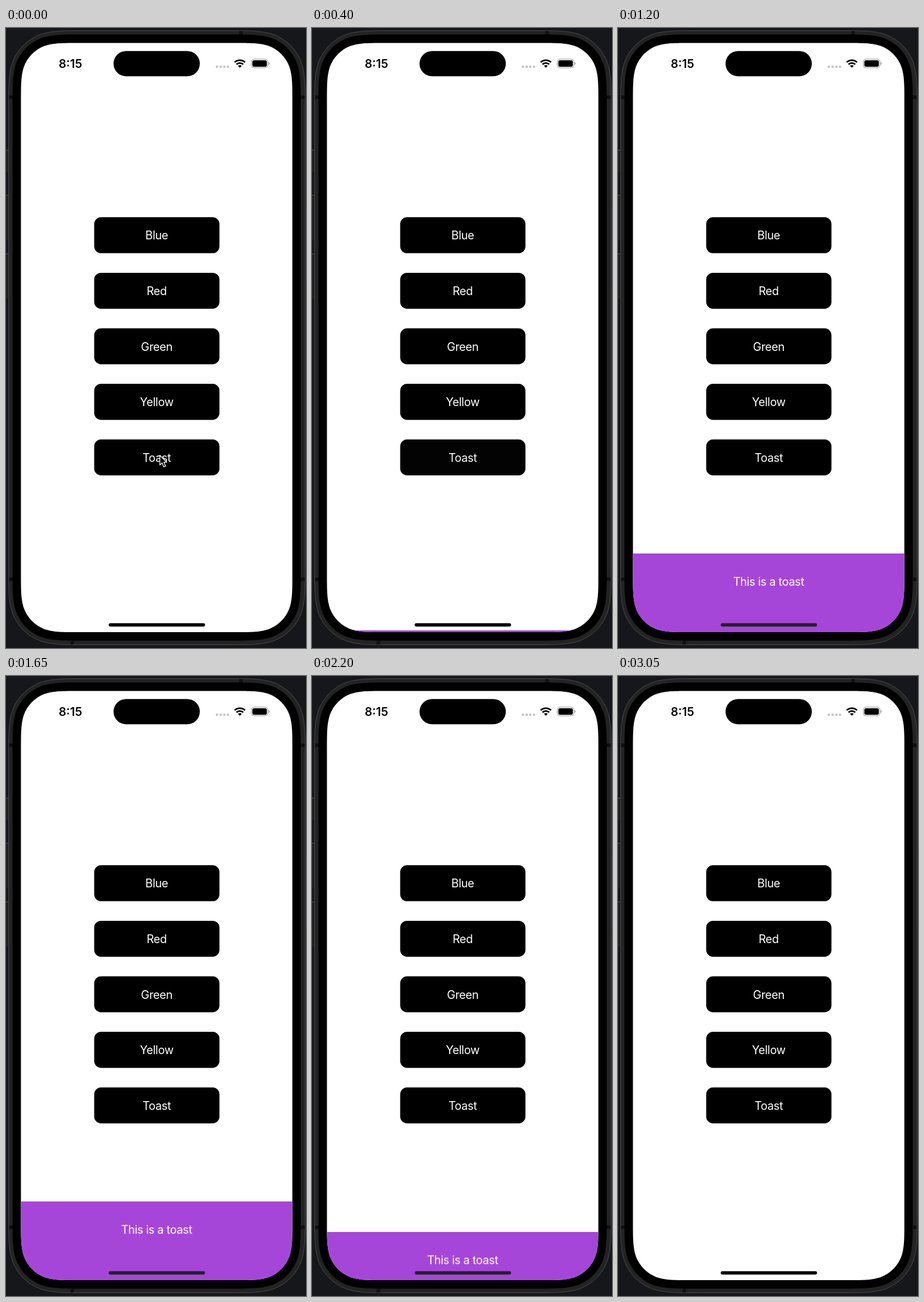
Animation, 512 px wide and 1056 px high, one loop 3100 ms. Source, as an HTML page:

```html
<!DOCTYPE html>
<html lang="en">
<head>
<meta charset="utf-8">
<title>Toast demo</title>
<style>
  html, body { margin: 0; width: 100%; height: 100%; overflow: hidden; background: #15171b; }
  svg { display: block; width: 512px; height: 1056px; }
  text { font: 400 19.5px Inter, Roboto, sans-serif; letter-spacing: -.4px; text-anchor: middle; fill: #fff; }
  .time { font-size: 20px; font-weight: 600; letter-spacing: 0; fill: #000; }
  #toast, #home, #cursor, .press rect, .press text { animation: 3100ms linear infinite; }
  #toast { animation-name: slide; }
  #home { animation-name: tint; }
  #cursor { animation-name: leave; }
  .press rect { animation-name: dim; }
  .press text { animation-name: dim-label; }

  @keyframes slide {
    0%, 11.68% { transform: translateY(136px); animation-timing-function: ease-in-out; }
    21.35%, 66.84% { transform: translateY(0); animation-timing-function: ease-in-out; }
    76.52%, 100% { transform: translateY(136px); }
  }
  @keyframes tint {
    0%, 14% { fill: #000; }
    17%, 72% { fill: #222; }
    75%, 100% { fill: #000; }
  }
  @keyframes leave {
    0%, 1.61% { transform: translate(262px, 727px); animation-timing-function: ease-in; }
    4.84% { transform: translate(273px, 723px); animation-timing-function: ease-in; }
    11.29%, 100% { transform: translate(530px, 690px); }
  }
  @keyframes dim {
    0%, 1.61% { fill: #000; }
    4.84%, 6.45% { fill: #6b6b6b; animation-timing-function: ease-out; }
    14%, 100% { fill: #000; }
  }
  @keyframes dim-label {
    0%, 1.61% { fill: #fff; }
    4.84%, 6.45% { fill: #b2b2b2; animation-timing-function: ease-out; }
    14%, 100% { fill: #fff; }
  }
</style>
</head>
<body>
<svg viewBox="0 0 512 1056">
  <defs><clipPath id="clip"><path class="screen"/></clipPath></defs>
  <rect width="512" height="1056" fill="#15171b"/>

  <g fill="#202022">
    <path d="M0 207.5h5v38h-5zM0 284h5v77h-5zM0 384h5v77h-5zM509 305h3v125h-3z"/>
    <path d="M0 208h4M0 284.5h4M0 384.5h4" stroke="#55565a"/>
  </g>
  <path id="shell" fill="#232324" stroke="#4b4b4d"/>
  <path d="M5 115h6v6h-6zM5 936h6v6h-6zM503 115h7v6h-7zM503 936h7v6h-7zM398 5h6v6h-6zM110 1044h6v6h-6z" fill="#101011"/>
  <path id="bezel"/>
  <path class="screen" fill="#fff"/>

  <text class="time" x="110" y="67.7">8:15</text>
  <rect x="183.5" y="39.2" width="147.3" height="43" rx="21.5"/>
  <g fill="#bdbdbf">
    <circle cx="360" cy="66" r="2"/><circle cx="366.3" cy="66" r="2"/>
    <circle cx="372.6" cy="66" r="2"/><circle cx="378.9" cy="66" r="2"/>
  </g>
  <g fill="none" stroke="#000" stroke-width="2.7">
    <path d="M390.2 58.4a12.8 12.8 0 0 1 17.8 0M393.4 62a8 8 0 0 1 11.4 0"/>
    <path d="M399.1 67.8l-3.2-3.2a4.6 4.6 0 0 1 6.4 0z" fill="#000" stroke="none"/>
  </g>
  <rect x="418.6" y="53.1" width="28.4" height="14.6" rx="4.6" fill="none" stroke="#a2a2a4" stroke-width="1.2"/>
  <rect x="420.4" y="54.9" width="24.8" height="11" rx="3"/>
  <path d="M448.4 58v5q1.7-.8 1.7-2.5t-1.7-2.5z" fill="#a2a2a4"/>

  <g id="buttons"></g>

  <g clip-path="url(#clip)">
    <g id="toast">
      <rect x="20" y="895" width="474" height="136" fill="#a546d9"/>
      <text x="257" y="949.6">This is a toast</text>
    </g>
  </g>
  <rect id="home" x="175.3" y="1013.8" width="164.4" height="5.6" rx="2.8"/>
  <path id="cursor" d="M.6 .8V17.4L4.4 13.8 7.2 20.4 10.2 19.1 7.4 12.7H12.4Z" stroke="#fff" stroke-width="1.3" stroke-linejoin="round"/>
</svg>
<script>
  const $ = q => document.querySelectorAll(q);

  // Rounded rectangle with continuous-curvature corners.
  function squircle(x0, y0, x1, y1, r) {
    const half = [[1.5287, 0], [1.0885, 0], [.8684, 0], [.6315, .0749], [.3728, .1691]];
    const corner = [...half, ...half.slice().reverse().map(([a, b]) => [b, a])];
    const place = (pts, right, bottom) => pts.map(([a, b]) =>
      `${right ? x1 - a * r : x0 + a * r} ${bottom ? y1 - b * r : y0 + b * r}`);
    const back = corner.slice().reverse();
    const sides = [place(back, 0, 0), place(corner, 1, 0), place(back, 1, 1), place(corner, 0, 1)];
    return 'M' + sides.map(p => p[0] + 'C' + p.slice(1).join(' ')).join('L') + 'Z';
  }

  const draw = (q, ...box) => $(q).forEach(el => el.setAttribute('d', squircle(...box)));
  draw('#shell', 4.5, 4.5, 510.5, 1050.5, 86);
  draw('#bezel', 11, 11, 503, 1043.5, 79);
  draw('.screen', 25.5, 25.5, 488.7, 1029, 65);

  $('#buttons')[0].innerHTML = ['Blue', 'Red', 'Green', 'Yellow', 'Toast'].map((name, i) => {
    const y = 322.3 + i * 94.6;
    return `<g${name === 'Toast' ? ' class="press"' : ''}>
      <rect x="150.5" y="${y}" width="213.8" height="61.3" rx="11.8"/>
      <text x="257.2" y="${y + 38.1}">${name}</text></g>`;
  }).join('');
</script>
</body>
</html>
```
